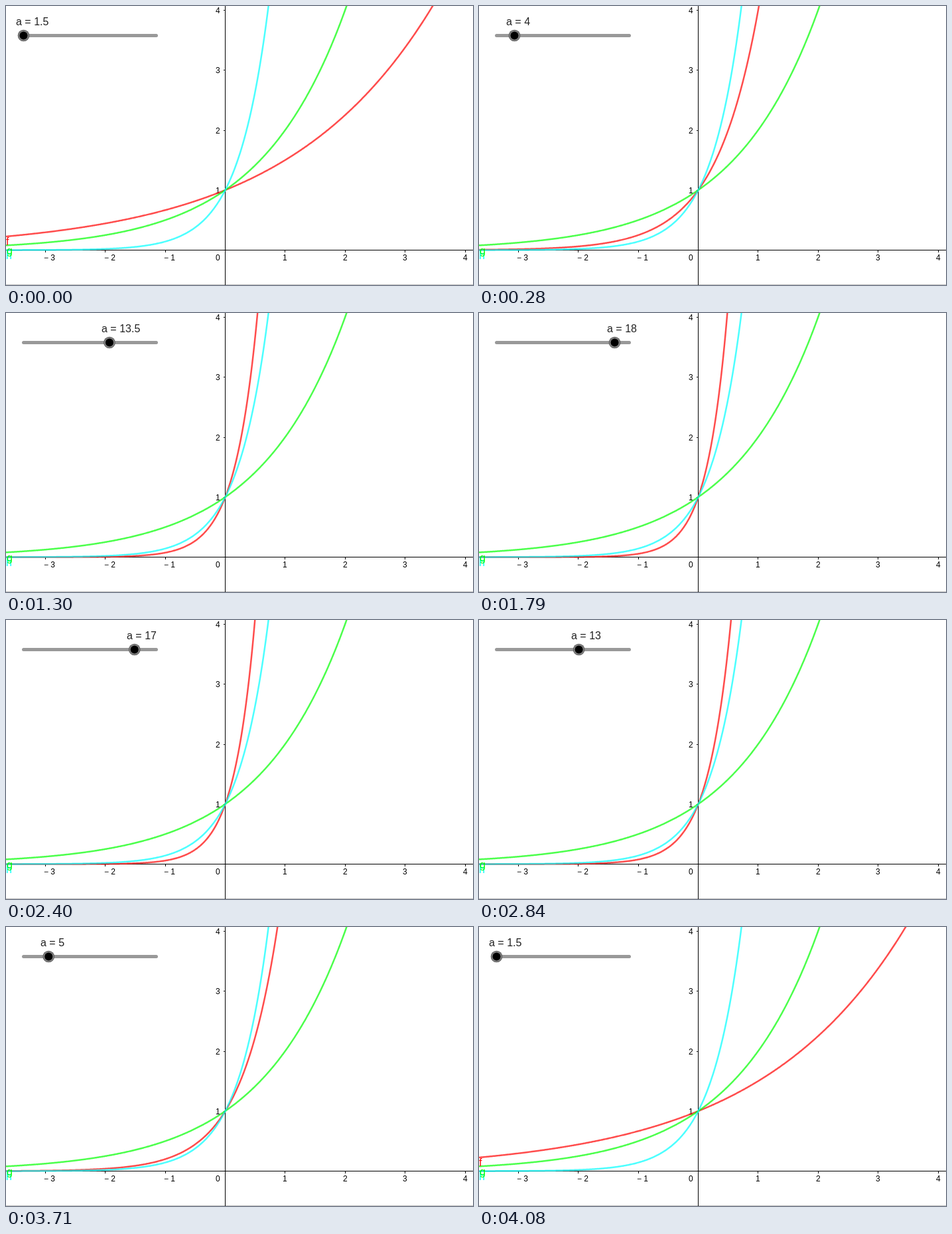
An HTML page with a canvas for the animation above (4140 ms loop, 704 px wide and 420 px high).

```html
<!DOCTYPE html>
<html lang="en">
<head>
<meta charset="utf-8">
<title>Exponential functions</title>
<style>
html, body { margin: 0; width: 100%; height: 100%; overflow: hidden; background: #fff; }
canvas { display: block; }
</style>
</head>
<body>
<canvas id="stage" width="704" height="420"></canvas>
<script>
const ctx = document.getElementById('stage').getContext('2d');
const W = 704, H = 420;
const OX = 330.5, OY = 367.5, UNIT = 90.4;
const RED = '#f00', GREEN = '#0f0', CYAN = '#0ff';

// The slider climbs in equal steps, rests at the top and descends again.
const LOOP = 4140, STEP = 54, RISE = 58, END = 4073;
const MIN = 1.5, MAX = 20, INC = 0.5;

function sliderValue(t) {
  const up = Math.floor((t - RISE) / STEP) + 1;
  const down = Math.floor((END - t) / STEP) + 1;
  const value = MIN + INC * Math.min(up, down);
  return Math.min(MAX, Math.max(MIN, value));
}

function text(str, x, y, size, color = '#000') {
  ctx.font = size + 'px "Liberation Sans", Arial, sans-serif';
  ctx.fillStyle = color;
  ctx.fillText(str, Math.round(x), Math.round(y));
}

function bar(x, y, w, h, color = '#000') {
  ctx.fillStyle = color;
  ctx.fillRect(x, y, w, h);
}

function disc(x, y, r, color) {
  ctx.fillStyle = color;
  ctx.beginPath();
  ctx.arc(x, y, r, 0, 2 * Math.PI);
  ctx.fill();
}

function drawAxes() {
  bar(0, 419, W, 1, '#c0c0c0');
  bar(0, 367, W, 1);
  bar(330, 0, 1, H);
  text('0', 316, 383, 12);
  for (let n = 1; n <= 4; n++) {
    const right = OX + n * UNIT, left = OX - n * UNIT, y = OY - n * UNIT;
    bar(Math.floor(right), 368, 1, 3);
    bar(Math.floor(left), 368, 1, 3);
    bar(328, Math.round(y), 2, 1);
    text(n, right - 3.5, 383, 12);
    text('\u2212 ' + n, left - 2, 383, 12);
    text(n, 316, y + 5, 12);
  }
}

const curveY = (base, x) => OY - UNIT * base ** ((x - OX) / UNIT);

function drawCurve(base, color) {
  ctx.strokeStyle = color;
  ctx.lineWidth = 2.5;
  ctx.beginPath();
  for (let x = -4; x <= W; x++) {
    const y = curveY(base, x);
    ctx.lineTo(x, y);
    if (y < -20) break;
  }
  ctx.stroke();
}

function drawSlider(a) {
  const x = 26.5 + (a - MIN) * 10.79, y = 44.5;
  ctx.strokeStyle = '#999';
  ctx.lineWidth = 5;
  ctx.lineCap = 'round';
  ctx.beginPath();
  ctx.moveTo(26.5, y);
  ctx.lineTo(226.5, y);
  ctx.stroke();
  disc(x, y, 8.8, '#555');
  disc(x, y, 8, '#808080');
  disc(x, y, 6, '#000');
  text('a = ' + a, x - 12, 29, 16, '#222');
}

function draw(t) {
  const a = sliderValue(t);
  bar(0, 0, W, H, '#fff');
  drawAxes();
  ctx.globalAlpha = 0.7;
  drawCurve(a, RED);
  drawCurve(2, GREEN);
  drawCurve(7, CYAN);
  ctx.globalAlpha = 1;
  if (a <= 2) text('f', 0, curveY(a, 0) + 13, 16, RED);
  text('h', 0, 381, 16, CYAN);
  text('g', 1, 374, 16, GREEN);
  drawSlider(a);
}

const begin = performance.now();
function tick() {
  draw((performance.now() - begin) % LOOP);
  requestAnimationFrame(tick);
}
tick();
</script>
</body>
</html>
```
